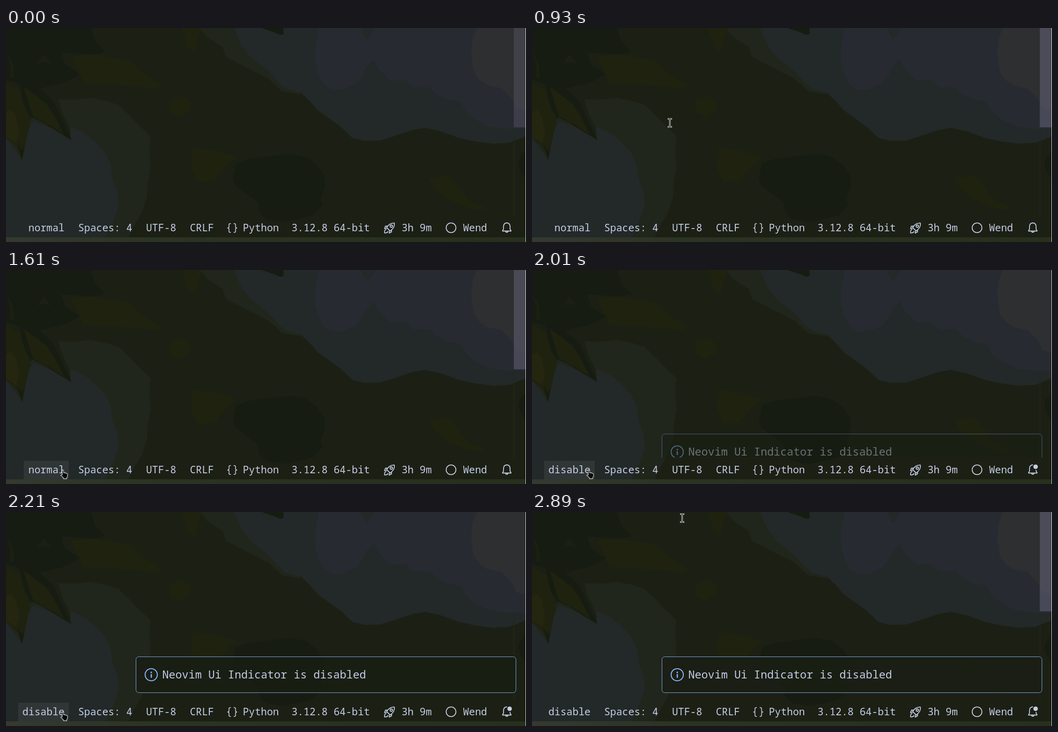
Write an HTML page that moves like this. It is 1110 px wide and 459 px high and loops after 2930 ms.

```html
<!DOCTYPE html>
<html lang="en">
<head>
<meta charset="utf-8">
<title>Status bar toggle</title>
<style>
html, body { margin: 0; width: 100%; height: 100%; overflow: hidden; background: #1c2014; }
svg { display: block; width: 1110px; height: 459px; }
text { font: 21.43px "Noto Sans Mono", "DejaVu Sans Mono", monospace; fill: #c5cee6; white-space: pre; }
.toast text { font-size: 23.4px; }
.line { fill: none; stroke: #c5cee6; stroke-width: 1.8; stroke-linejoin: round; }
.dark { fill: #171c12; }
.olive { fill: #1e220f; }
.moss { fill: #21261c; }
.slate { fill: #232928; }
.blue { fill: #272b31; }
.grey { fill: #2d2f30; }
.base { fill: #1c2014; }
.hover { fill: #fff; fill-opacity: .06; }
.outline { fill: none; stroke: #dadada; stroke-width: 3; stroke-linecap: square; }
.core { fill: none; stroke: #0a0a0a; stroke-width: 1; stroke-linecap: square; }
.pointer { fill: #080808; stroke: #e0e0e0; stroke-width: 1.1; stroke-linejoin: round; }
#cursor > g { visibility: hidden; }

.bar, .before, .after, .hover1, .hover2, .dot, .toast { animation: 2930ms infinite step-end; }
.bar { fill: rgb(122, 119, 148); fill-opacity: .4; animation-name: bar; animation-timing-function: linear; }
.before { animation-name: before; }
.after { animation-name: after; }
.hover1 { animation-name: hover1; }
.hover2 { animation-name: hover2; }
.dot { animation-name: dot; }
.toast { animation-name: toast; }

@keyframes bar {
  0% { opacity: .58; }
  2.73%, 54.27% { opacity: 1; }
  67.92%, 83.62% { opacity: 0; }
  88.4%, 100% { opacity: 1; }
}
@keyframes before { 0% { opacity: 1; } 63.1%, 100% { opacity: 0; } }
@keyframes after { 0% { opacity: 0; } 63.1%, 100% { opacity: 1; } }
@keyframes hover1 { 0% { opacity: 0; } 44% { opacity: 1; } 63.1%, 100% { opacity: 0; } }
@keyframes hover2 { 0% { opacity: 0; } 63.1% { opacity: 1; } 82.2%, 100% { opacity: 0; } }
@keyframes dot { 0% { opacity: 0; } 65.8%, 100% { opacity: 1; } }
@keyframes toast {
  0% { opacity: 0; transform: translateY(78px); }
  65.36% { opacity: 0; transform: translateY(78px); animation-timing-function: ease-out; }
  75.6%, 100% { opacity: 1; transform: none; }
}
</style>
</head>
<body>
<svg viewBox="0 0 1110 459">
  <defs>
    <clipPath id="editor"><rect width="1110" height="402"/></clipPath>
    <linearGradient id="edge">
      <stop offset="0" stop-color="#343a30"/>
      <stop offset=".3" stop-color="#2b3322"/>
      <stop offset="1" stop-color="#26301d"/>
    </linearGradient>
  </defs>

  <!-- wallpaper -->
  <rect class="base" width="1110" height="459"/>
  <path class="olive" d="M138 62 180 57 265 70 290 96 333 122 322 130 300 127 240 122 165 118 158 98ZM375 0H420L410 20 403 52 388 40ZM350 155 375 146 395 160 392 178 370 190 348 180ZM398 258 440 262 492 277 470 295 446 325 410 332 395 300ZM903 322 945 317 965 340 985 368 1030 388 990 388 945 368 915 345Z"/>
  <path class="moss" d="M415 0 428 18 462 40 470 62 520 88 560 108 590 136 630 142 560 60 500 0Z"/>
  <path class="slate" d="M487 0 503 38 522 62 560 92 585 120 598 130 630 139 648 156 665 176 715 212 740 236 765 242 800 241 840 228 870 218 895 214 930 222 965 235 1000 243 1040 248 1075 246 1110 232V0Z"/>
  <path class="dark" d="M545 0H592L593 12 586 15 572 9Z"/>
  <path class="blue" d="M668 0 660 40 660 75 667 100 680 122 697 133 718 131 745 121 760 103 768 85 785 67 796 88 822 113 852 112 870 127 905 127 920 142 942 153 970 158 983 180 1005 198 1035 211 1070 216 1110 216V0Z"/>
  <path class="slate" d="M757 0 764 17 771 25 778 15 789 0Z"/>
  <path class="grey" d="M1005 0 996 24 993 55 998 92 1010 111 1028 123 1058 129 1076 147 1084 158 1088 172 1110 176V0Z"/>
  <path class="moss" d="M112 153 150 154 180 150 212 156 240 165 262 186 280 205 308 232 306 262 308 300 303 330 301 362 290 395 270 430 262 449H0V240L60 190 140 240 135 212 120 182Z"/>
  <path class="slate" d="M0 235 33 281 45 225 58 200 100 216 138 241 137 212 165 224 190 244 212 268 223 292 228 325 238 352 241 378 230 412 212 449H0Z"/>
  <path class="dark" d="M0 0H182L190 28 213 52 188 57 155 55 118 53 126 78 158 99 135 112 120 119 95 124 72 131 100 155 114 185 128 215 140 240 112 224 80 203 52 190 38 150 28 120 0 112Z"/>
  <path class="base" d="M80 57 67 76 83 72 97 77ZM0 50 14 75 18 104 8 108 10 82Z"/>
  <path class="olive" d="M38 126 60 142 86 162 103 187 124 229 92 208 58 190 48 160ZM0 120 30 135 44 165 51 205 45 232 35 282 24 258 0 236Z"/>
  <path fill="#25260f" d="M0 182 10 175 21 188 28 225 22 246 0 234Z"/>
  <path class="dark" d="M30 122 43 150 50 188 42 175 34 150ZM24 248 34 262 39 254 34 283ZM491 290 520 280 555 276 606 270 640 276 664 294 680 318 681 340 672 365 676 380 655 402 630 409 590 416 555 410 540 395 538 375 515 358 488 337 484 322ZM1110 262 1097 278 1093 292 1100 310 1110 324Z"/>
  <rect x="1084" y="213" width="1" height="192" fill="#22271f"/>
  <rect y="449" width="1110" height="10" fill="url(#edge)"/>

  <rect class="bar" x="1084" width="25" height="213"/>

  <!-- notification -->
  <g clip-path="url(#editor)">
    <g class="toast">
      <rect x="277.5" y="310.5" width="811" height="77" rx="6" fill="#1b1f14" fill-opacity=".85" stroke="#7fa8e6"/>
      <circle cx="310" cy="349" r="13" fill="none" stroke="#89b4fa" stroke-width="2.1"/>
      <path d="M308.6 342.5h3v3h-3zM308.8 347.5h2.6v8h-2.6z" fill="#89b4fa"/>
      <text x="333.5" y="357">Neovim Ui Indicator is disabled</text>
    </g>
  </g>

  <!-- status bar -->
  <rect class="hover hover1" x="38" y="409" width="96" height="40"/>
  <rect class="hover hover2" x="26" y="409" width="108" height="40"/>
  <g>
    <text class="before" x="47.8" y="436">normal</text>
    <text class="after" x="35" y="436">disable</text>
    <text x="154" y="436">Spaces: 4</text>
    <text x="299" y="436">UTF-8</text>
    <text x="392.5" y="436">CRLF</text>
    <text x="505.5" y="436">Python</text>
    <text x="609.5" y="436">3.12.8 64-bit</text>
    <text x="844.5" y="436">3h 9m</text>
    <text x="975.5" y="436">Wend</text>
  </g>
  <g class="line">
    <path id="brace" stroke-width="1.6" d="M480 419.5H478.5Q476 419.5 476 422V426.5Q476 429 473 429Q476 429 476 431.5V436Q476 438.5 478.5 438.5H480"/>
    <use href="#brace" transform="translate(966) scale(-1 1)"/>
    <path d="M829 418.5Q819 417.5 812.5 428L820 435.5Q830.5 428 829 418.5ZM815 425H810L808 430.5 812.5 429M823 433V437.5L818 440 819 435.5M812 431.5Q807.5 433 808 439.5Q814 440 816 436"/>
    <circle cx="822.5" cy="425" r="2.5"/>
    <circle cx="950" cy="428.5" r="10.4"/>
    <path d="M1069 418Q1062 418.5 1062 426V431.5L1060 434.5V435.5H1078V434.5L1076 431.5V426Q1076 418.5 1069 418ZM1066.4 436A2.7 3 0 0 0 1071.6 436"/>
  </g>
  <g class="dot">
    <circle cx="1075" cy="422" r="7" class="base"/>
    <circle cx="1075" cy="422" r="4.8" fill="#c5cee6"/>
  </g>

  <rect x="1109" width="1" height="459" fill="#dcdedc"/>

  <g id="cursor">
    <g id="beam">
      <path class="outline" d="M-3-8.5H3M0-8.5V8.5M-3 8.5H3"/>
      <path class="core" d="M-3-8.5H3M0-8.5V8.5M-3 8.5H3"/>
    </g>
    <g id="arrow"><path class="pointer" d="M.5 .5V16.8L4.2 13.3 6.6 19.3 9.3 18.2 6.8 12.3H12Z"/></g>
    <g id="hand"><path class="pointer" d="M4 1.8Q5.5 0 7 1.8V7Q8.6 6 10 7.5Q11.6 6.6 12.8 8.3Q15 7.8 15.3 10V14.5L13.5 17.5V19.6H6.5V17.5L1 12.6Q1 9.8 4 12Z"/></g>
  </g>
</svg>
<script>
const LOOP = 2930, STEP = 40;
const $ = id => document.getElementById(id);

// time, x, y
const path = [
  [40, 325.5, 13], [80, 326, 54], [120, 332.5, 92], [160, 340, 137], [240, 341.5, 138],
  [570, 341.5, 138], [610, 341.5, 140], [730, 339, 143], [810, 329, 153], [890, 308.5, 186],
  [970, 280, 221], [1050, 228, 285], [1130, 149.5, 401], [1210, 149.5, 401],
  [1250, 134, 411], [1290, 122, 424], [1370, 116, 428], [2370, 116, 428],
  [2410, 140, 400], [2450, 187, 303], [2490, 237, 225], [2530, 272, 147], [2570, 285.5, 111],
  [2610, 298, 97], [2690, 306.5, 70], [2770, 317.5, 38], [2850, 321, 10], [2890, 320.5, 13]
];

function place(t) {
  const i = path.findIndex(p => p[0] >= t);
  if (i < 1) return i < 0 ? path[path.length - 1] : path[0];
  const a = path[i - 1], b = path[i], k = (t - a[0]) / (b[0] - a[0]);
  return a.map((v, n) => v + (b[n] - v) * k);
}

function shape(t) {
  if (t < 40) return "";
  if (t < 1250 || t >= 2450) return "beam";
  return t >= 1290 && t < 2410 ? "hand" : "arrow";
}

let start;
function draw(now) {
  start ??= now;
  const time = (now - start + 2) % LOOP;
  const shift = time < 250 ? 0 : 10;
  const t = Math.floor((time - shift) / STEP) * STEP + shift;
  const [, x, y] = place(t), kind = shape(t);
  $("cursor").setAttribute("transform", `translate(${x} ${y})`);
  for (const id of ["beam", "arrow", "hand"])
    $(id).style.visibility = id === kind ? "visible" : "hidden";
  requestAnimationFrame(draw);
}
requestAnimationFrame(draw);
</script>
</body>
</html>
```
